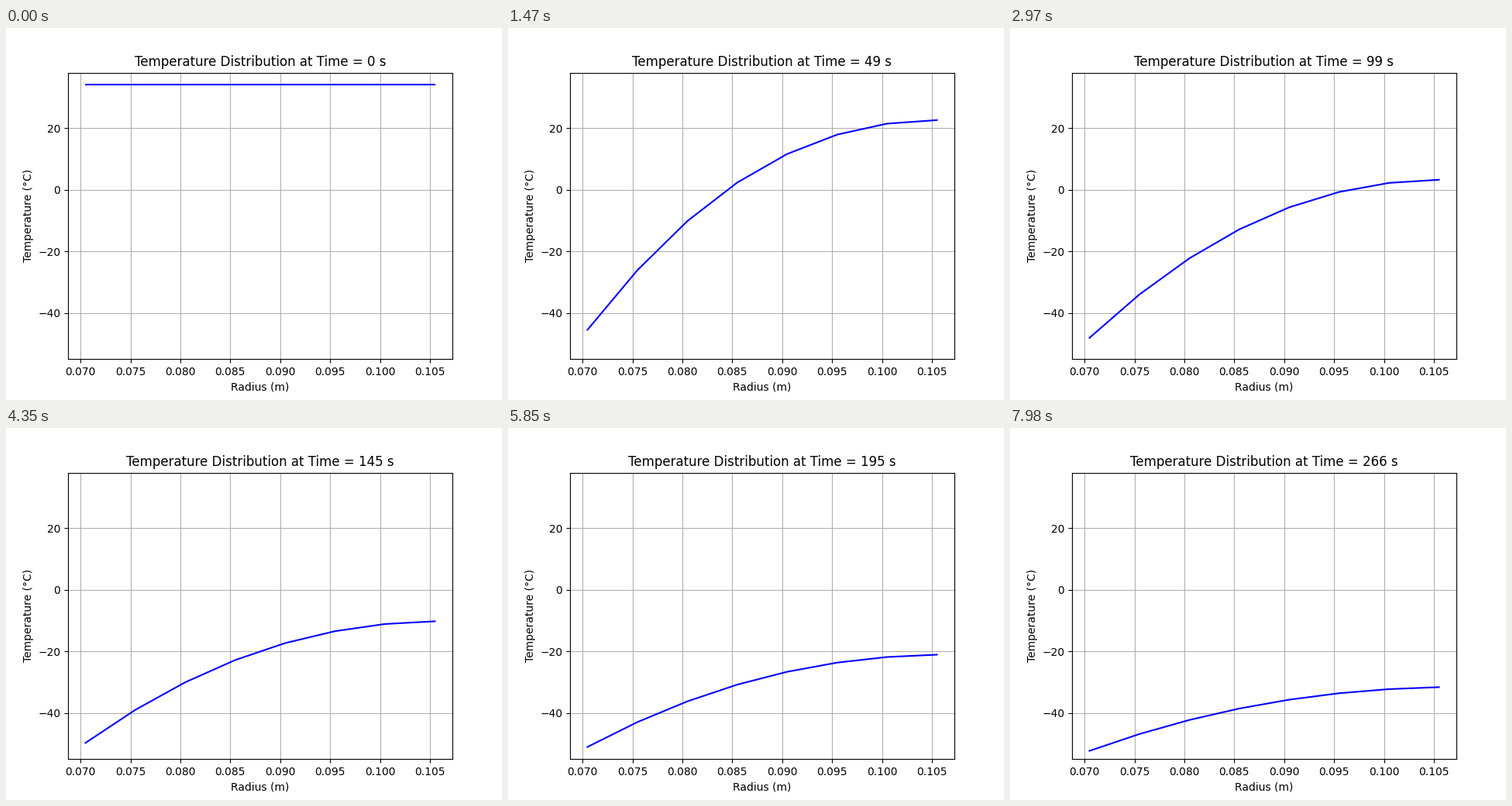
A matplotlib script for the animation above (8 s loop, 640 px wide and 480 px high).

```python
import numpy as np
import matplotlib.pyplot as plt
from matplotlib.animation import FuncAnimation

LOOP_MS, TICK_MS, STEP_MS = 8000, 20, 30
STEPS = 267

# Explicit heat conduction through a thick shell, one second per step
DR = 0.005
FO = 0.194                       # Fourier number of the interior nodes
T_START, T_COLD, T_ROOM = 34.0, -55.0, 34.0
COOL, INFLOW = 0.896, 0.436      # inner surface: convection, conduction
GAIN = 0.002                     # outer surface: heat gain from the room

radius = 0.0705 + DR * np.arange(8)


def advance(T):
    new = T.copy()
    gap = np.diff(T)
    e = DR / radius[1:-1]
    new[1:-1] += FO * ((1 + e) * gap[1:] - (1 - e) * gap[:-1])
    new[0] += INFLOW * gap[0] - COOL * (T[0] - T_COLD)
    new[-1] += GAIN * (T_ROOM - T[-1]) - 2 * FO * gap[-1]
    return new


history = [np.full(radius.size, T_START)]
while len(history) < STEPS:
    history.append(advance(history[-1]))

fig, ax = plt.subplots(figsize=(6.4, 4.8), dpi=100)
line, = ax.plot(radius, history[0], color="blue")
ax.set_ylim(-55, 38)
ax.set_xlabel("Radius (m)")
ax.set_ylabel("Temperature (°C)")
title = ax.set_title("Temperature Distribution at Time = 0 s")
ax.grid(True)


def draw(i):
    second = min((i * TICK_MS + TICK_MS // 2) // STEP_MS, STEPS - 1)
    line.set_ydata(history[second])
    title.set_text(f"Temperature Distribution at Time = {second} s")
    return line, title


anim = FuncAnimation(fig, draw, frames=LOOP_MS // TICK_MS, interval=TICK_MS,
                     repeat=True, repeat_delay=0, blit=False)
plt.show()
```
